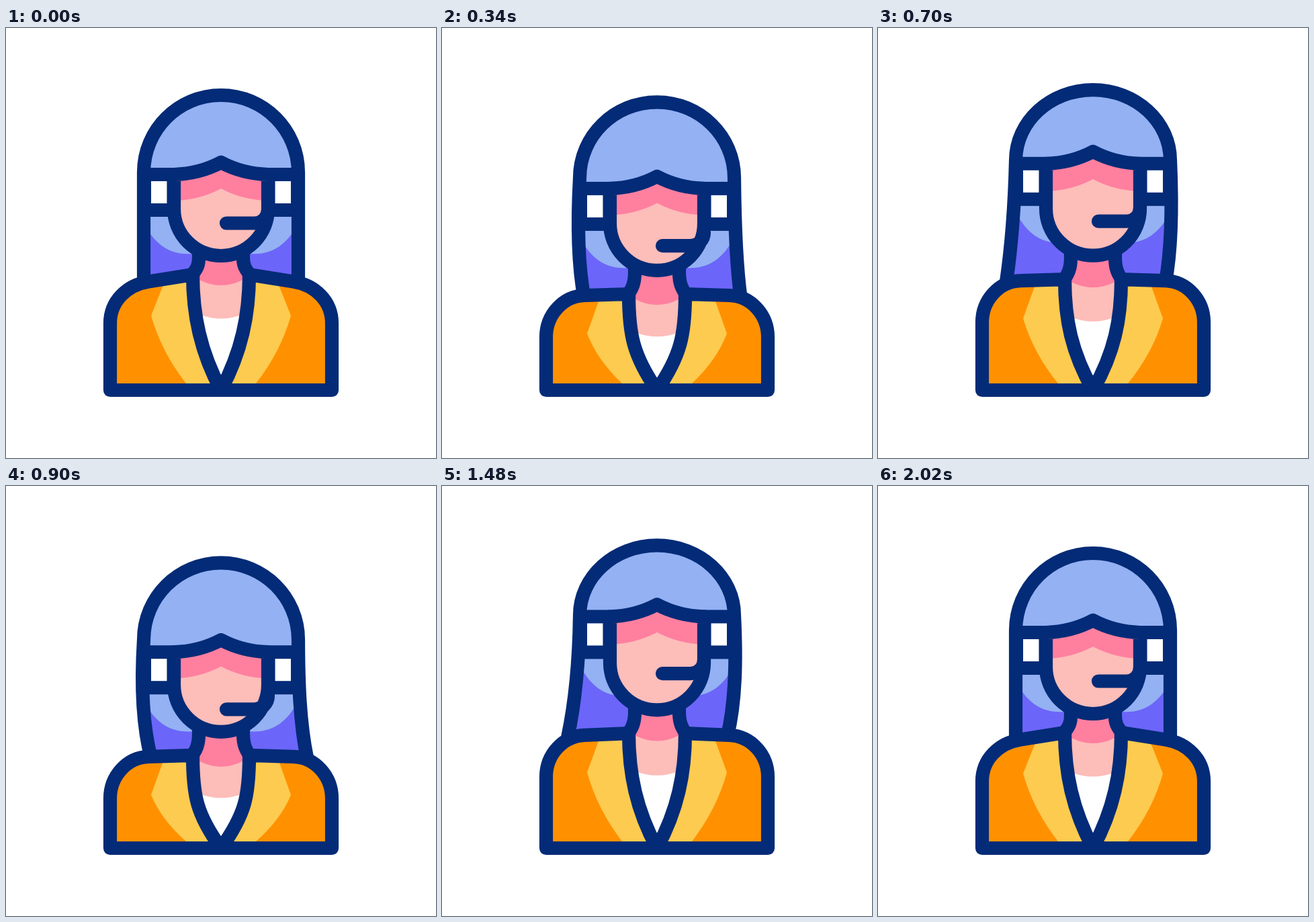
These frames come from a looping animation (640 px wide and 640 px high, 2420 ms). An HTML page with a canvas:

```html
<!DOCTYPE html>
<html lang="en">
<head>
<meta charset="utf-8">
<title>Support agent</title>
<style>
  html, body { margin: 0; width: 100%; height: 100%; overflow: hidden; background: #fff; }
  canvas { display: block; }
</style>
</head>
<body>
<canvas id="stage" width="640" height="640"></canvas>
<script>
const ctx = document.getElementById('stage').getContext('2d');

const LOOP = 2420, STEP = 20;
const INK = '#042b77', HAIR = '#93b1f3', PURPLE = '#6c65f9', SKIN = '#fdbdb9',
      PINK = '#ff7f9f', ORANGE = '#ff9100', YELLOW = '#fdcb50', WHITE = '#fff';

// head: head offset; crown, dome: hair top and where its arc ends;
// chin, mic, shoulder, collar, tip, neck: heights
// l1..l3, r1..r3: sideways bend of the two hair edges
const rest = { head: 0, crown: 100, dome: 215, chin: 339, mic: 290.5, shade: 0,
  shoulder: 377.5, collar: 367, tip: 428, neck: 383,
  l1: 0, l2: 0, l3: 0, r1: 0, r2: 0, r3: 0 };
const low = { head: 39.5, crown: 119.5, dome: 236, chin: 372, mic: 342.5, shade: 39.5,
  shoulder: 409, collar: 407, tip: 466, neck: 425,
  l1: -4.5, l2: -2, l3: 17, r1: -0.5, r2: 2, r3: 18 };
const high = { head: -26.5, crown: 87, dome: 190, chin: 332.5, mic: 277.5, shade: -24,
  shoulder: 370, collar: 368, tip: 426, neck: 379,
  l1: -1, l2: -7, l3: -20, r1: 3.5, r2: 3, r3: -12 };

function blend(a, b, k) {
  const out = {};
  for (const key in a) out[key] = a[key] + (b[key] - a[key]) * k;
  return out;
}

const keys = [
  [0, rest], [200, low], [600, high], [1000, low], [1400, high],
  [1800, blend(rest, low, 0.04)], [2000, rest]
];

function poseAt(t) {
  for (let i = 1; i < keys.length; i++) {
    const [t0, a] = keys[i - 1], [t1, b] = keys[i];
    if (t < t1) {
      const x = (t - t0) / (t1 - t0);
      return blend(a, b, x * x * (3 - 2 * x));
    }
  }
  return rest;
}

function fill(path, color) {
  ctx.fillStyle = color;
  ctx.fill(path);
}

function line(path, cap = 'butt') {
  ctx.lineCap = cap;
  ctx.stroke(path);
}

function clipped(path, draw) {
  ctx.save();
  ctx.clip(path);
  draw();
  ctx.restore();
}

// Runs a drawing for the left half, then again mirrored.
function bothSides(draw) {
  draw();
  ctx.save();
  ctx.translate(640, 0);
  ctx.scale(-1, 1);
  draw();
  ctx.restore();
}

function hair(p) {
  const top = p.dome, end = p.shoulder + 3, d = end - top;
  const ry = top - p.crown, k = 0.5523;
  const y1 = top + d * 0.35, y2 = top + d * 0.7;
  const shape = new Path2D();
  shape.moveTo(205 + p.l3, end);
  shape.bezierCurveTo(205 + p.l2, y2, 205 + p.l1, y1, 205, top);
  shape.bezierCurveTo(205, top - ry * k, 320 - 115 * k, p.crown, 320, p.crown);
  shape.bezierCurveTo(320 + 115 * k, p.crown, 435, top - ry * k, 435, top);
  shape.bezierCurveTo(435 + p.r1, y1, 435 + p.r2, y2, 435 + p.r3, end);

  fill(shape, PURPLE);
  clipped(shape, () => bothSides(() => {
    const y = p.head;
    const light = new Path2D();
    light.moveTo(320, 0);
    light.lineTo(150, 0);
    light.lineTo(196, 270 + y);
    light.quadraticCurveTo(203, 291 + y, 216, 308 + y);
    light.bezierCurveTo(230, 327 + y, 250, 338 + y, 277, 336 + y);
    light.lineTo(320, 336 + y);
    fill(light, HAIR);
  }));
  line(shape);
}

function neckLine(path, p) {
  const top = p.chin - 7, start = p.chin + 3;
  path.moveTo(287, top);
  path.lineTo(287, start);
  path.bezierCurveTo(287, start + (p.collar - start) * 0.6, 281, p.collar - 6, 277.5, p.collar);
}

function lapelEdge(path, p) {
  const drop = p.collar - 367;
  path.bezierCurveTo(278, p.collar + 60, 289.5 - drop * 0.17, 482 + drop * 0.2, 320, 539);
}

function arcBelow(y, sag, color) {
  const area = new Path2D();
  area.moveTo(260, 300);
  area.lineTo(260, y - sag);
  area.lineTo(288, y - sag);
  area.quadraticCurveTo(320, y + sag, 352, y - sag);
  area.lineTo(380, y - sag);
  area.lineTo(380, 300);
  fill(area, color);
}

function chest(p) {
  bothSides(() => {
    const half = new Path2D();
    neckLine(half, p);
    half.lineTo(278, p.collar);
    lapelEdge(half, p);
    half.lineTo(320, p.chin - 7);
    fill(half, WHITE);
    clipped(half, () => {
      arcBelow(p.tip + 4.5, 6, SKIN);
      arcBelow(p.neck, 8, PINK);
    });
  });
}

function jacket(p) {
  const s = p.shoulder, slope = (s - p.collar) / 66;
  bothSides(() => {
    const side = new Path2D();
    side.moveTo(320, 539);
    side.lineTo(155, 539);
    side.lineTo(155, s + 62);
    side.bezierCurveTo(155, s + 29, 180, s + 32 * slope, 212, s);
    side.lineTo(278, p.collar);
    lapelEdge(side, p);
    side.closePath();
    fill(side, ORANGE);

    clipped(side, () => {
      const lapel = new Path2D();
      lapel.moveTo(238, s - 5);
      lapel.lineTo(216, p.tip);
      lapel.quadraticCurveTo(231, p.tip + (529 - p.tip) * 0.53, 268, 529);
      lapel.lineTo(276, 539);
      lapel.lineTo(330, 539);
      lapel.lineTo(330, s - 20);
      lapel.lineTo(245, s - 20);
      fill(lapel, YELLOW);
    });
    line(side);

    const neck = new Path2D();
    neckLine(neck, p);
    line(neck, 'round');
  });
}

function fringe(path, y) {
  path.lineTo(250, 218 + y);
  path.quadraticCurveTo(288, 217 + y, 320, 200 + y);
  path.quadraticCurveTo(352, 217 + y, 390, 218 + y);
}

function face(p) {
  const y = p.head, cheek = p.chin - 70;
  const shape = new Path2D();
  shape.moveTo(250, cheek);
  fringe(shape, y);
  shape.lineTo(390, cheek);
  shape.arc(320, cheek, 70, 0, Math.PI);
  shape.closePath();
  fill(shape, SKIN);

  clipped(shape, () => {
    const shade = new Path2D();
    shade.moveTo(250, 150);
    fringe(shade, p.shade + 39);
    shade.lineTo(390, 150);
    fill(shade, PINK);
  });

  bothSides(() => {
    ctx.fillStyle = INK;
    ctx.fillRect(205, 208 + y, 45, 73);
    ctx.fillStyle = WHITE;
    ctx.fillRect(216, 228 + y, 23.5, 33);
  });
  line(shape);

  const mic = new Path2D();
  mic.moveTo(328, p.mic);
  mic.lineTo(370, p.mic);
  mic.arcTo(390, p.mic, 390, p.mic - 20, 20);
  line(mic, 'round');
}

function draw(t) {
  const p = poseAt(t);
  ctx.fillStyle = WHITE;
  ctx.fillRect(0, 0, 640, 640);
  ctx.strokeStyle = INK;
  ctx.lineWidth = 20.2;
  ctx.lineJoin = 'round';
  hair(p);
  chest(p);
  jacket(p);
  face(p);
}

let begin = null;
function tick(now) {
  if (begin === null) begin = now;
  draw(Math.floor((now - begin) % LOOP / STEP) * STEP);
  requestAnimationFrame(tick);
}
draw(0);
requestAnimationFrame(tick);
</script>
</body>
</html>
```
